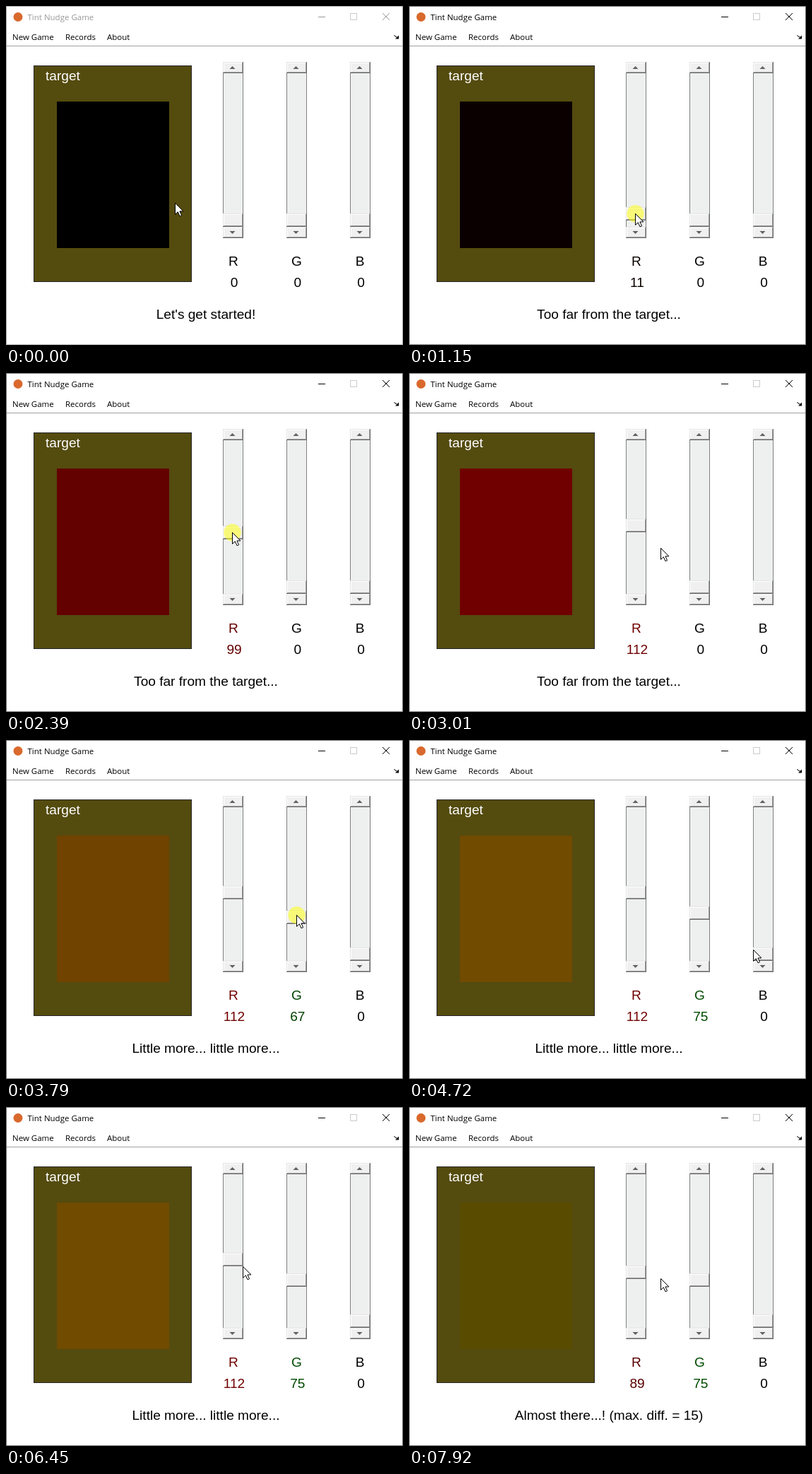
Write an HTML page that moves like this. It is 562 by 479 pixels and loops after 8 s.

```html
<!DOCTYPE html>
<html lang="en">
<head>
<meta charset="utf-8">
<title>Tint Nudge Game</title>
<style>
html, body { margin: 0; width: 100%; height: 100%; overflow: hidden; background: #fff; }
svg { display: block; }
.ui { font: 11.5px "Open Sans", "Noto Sans", sans-serif; }
.body { font: 19.1px "Liberation Sans", Arial, sans-serif; }
.mid { text-anchor: middle; }
#win { --ink: #000; --edge: #6e6e6e; }
#win.idle { --ink: #999; --edge: #a9a9a9; }
.ink { fill: var(--ink); }
.line { fill: none; stroke: var(--ink); }
</style>
</head>
<body>
<svg id="win" width="562" height="479" viewBox="0 0 562 479">
  <rect x=".5" y=".5" width="561" height="478" fill="#fff" stroke="var(--edge)"/>

  <circle cx="17" cy="15.5" r="6.5" fill="#d9692c"/>
  <text class="ui ink" x="30.5" y="20">Tint Nudge Game</text>
  <path class="line" d="M442 15.5h10"/>
  <rect x="487.5" y="10.5" width="9" height="9" fill="none" stroke="#ccc"/>
  <path class="line" d="M533 10l10 10M543 10l-10 10"/>

  <g class="ui">
    <text x="9" y="48">New Game</text>
    <text x="84" y="48">Records</text>
    <text x="143" y="48">About</text>
  </g>
  <path d="M549.5 41q1 2.5 4 3" fill="none" stroke="#000"/>
  <path d="M556 41.5v5h-5z"/>
  <path d="M1 56.5h560" stroke="#a0a0a0"/>

  <rect x="39.5" y="84.5" width="223" height="305" fill="#544b0f" stroke="#262626"/>
  <rect id="mix" x="72" y="135" width="159" height="207"/>
  <text class="body" x="56" y="105" fill="#fff">target</text>

  <g id="sliders"></g>
  <text id="msg" class="body mid" x="283" y="442"></text>

  <g id="pointer">
    <circle id="glow" cx=".5" cy=".5" r="12.2" fill="#ff0" fill-opacity=".5"/>
    <path d="M.5 .5v16l3.8-3.6 2.7 6 2.6-1.1-2.7-5.8h5z" fill="#fff" stroke="#000"/>
  </g>
</svg>
<script>
const LOOP = 8000, STEP = 77;
const TARGET = [84, 75, 15];
const $ = id => document.getElementById(id);
const mix = (a, b, p) => a + (b - a) * p;
const thumbY = v => Math.round(293 - 0.776 * v);
const sliderX = i => 320 + 90.5 * i;

// Each action takes the state s and its eased progress p.
const go = (slider, grab) => (s, p) => {
  s.x = mix(s.x, sliderX(slider), p);
  s.y = mix(s.y, thumbY(s.rgb[slider]) + grab, p);
  s.down = p === 1;
  if (s.down) Object.assign(s, { slider, grab, active: true });
};
const drag = value => (s, p) => {
  const v = Math.round(mix(s.rgb[s.slider], value, p));
  s.rgb[s.slider] = v;
  s.y = thumbY(v) + s.grab;
  s.played = true;
};
const drift = (dx, dy, down) => (s, p) => {
  s.x += dx * p;
  s.y += dy * p;
  s.down = down;
};

const script = [
  [70, 760, go(0, 9)],
  [910, 1460, drag(14)],
  [2160, 2460, drag(103)],
  [2690, 2790, drag(112)],
  [2690, 2790, drift(5, 2, true)],
  [3010, 3320, go(1, 6)],
  [3400, 3790, drag(67)],
  [3870, 3940, drag(88)],
  [4280, 4420, drag(75)],
  [4570, 4880, go(2, 13)],
  [4960, 5270, drag(48)],
  [5590, 5670, drag(58)],
  [5820, 5890, drag(0)],
  [6140, 6600, go(0, 12)],
  [6680, 6830, drag(79)],
  [7230, 7380, drag(89)],
  [7840, 7920, drift(36, 6, false)]
];

// Stepped ease-out: the first step shows at once, the last one at the end.
function progress(t, start, end) {
  const gaps = Math.round((end - start) / STEP);
  const done = Math.floor((t - start) / (end - start) * gaps + 0.06);
  const left = 1 - Math.min(1, (done + 1) / (gaps + 1));
  return 1 - left * left;
}

function stateAt(t) {
  const s = { x: 239, y: 278, rgb: [0, 0, 0] };
  for (const [start, end, act] of script)
    if (t >= start) act(s, progress(t, start, end));
  return s;
}

function message(s) {
  if (!s.played) return "Let's get started!";
  const diff = Math.max(...s.rgb.map((v, i) => Math.abs(v - TARGET[i])));
  if (diff > 34) return "Too far from the target...";
  if (diff > 20) return "Little more... little more...";
  return `Almost there...! (max. diff. = ${diff})`;
}

function bevel(y, h) {
  return `<rect y="${y}" width="29" height="${h}" fill="#696969"/>
    <rect y="${y}" width="28" height="${h - 1}" fill="#e3e3e3"/>
    <rect x="1" y="${y + 1}" width="27" height="${h - 2}" fill="#a0a0a0"/>
    <rect x="1" y="${y + 1}" width="26" height="${h - 3}" fill="#fff"/>
    <rect x="2" y="${y + 2}" width="25" height="${h - 4}" fill="#f0f0f0"/>`;
}

$("sliders").innerHTML = [..."RGB"].map((name, i) => `
  <g transform="translate(${307 + 90 * i})">
    <rect y="95" width="29" height="217" fill="#808080"/>
    <rect x="1" y="95" width="27" height="217" fill="#eef0ef"/>
    ${bevel(79, 16)}${bevel(312, 16)}
    <path d="M9.5 89l4-4 4 4zM9.5 318l4 4 4-4z" fill="#606060"/>
    <g id="thumb${i}">${bevel(0, 19)}</g>
  </g>
  <g id="label${i}" class="body mid">
    <text x="${322 + 89.5 * i}" y="367">${name}</text>
    <text id="num${i}" x="${323 + 89.8 * i}" y="397"></text>
  </g>`).join("");

function draw(t) {
  const s = stateAt(t);
  s.rgb.forEach((v, i) => {
    const tint = [0, 0, 0];
    tint[i] = v;
    $("thumb" + i).setAttribute("transform", `translate(0 ${thumbY(v)})`);
    $("label" + i).setAttribute("fill", `rgb(${tint})`);
    $("num" + i).textContent = v;
  });
  $("mix").setAttribute("fill", `rgb(${s.rgb})`);
  $("msg").textContent = message(s);
  $("win").classList.toggle("idle", !s.active);
  $("glow").setAttribute("visibility", s.down ? "visible" : "hidden");
  $("pointer").setAttribute("transform", `translate(${Math.round(s.x)} ${Math.round(s.y)})`);
}

const start = performance.now();
function tick() {
  draw((performance.now() - start) % LOOP);
  requestAnimationFrame(tick);
}
tick();
</script>
</body>
</html>
```
